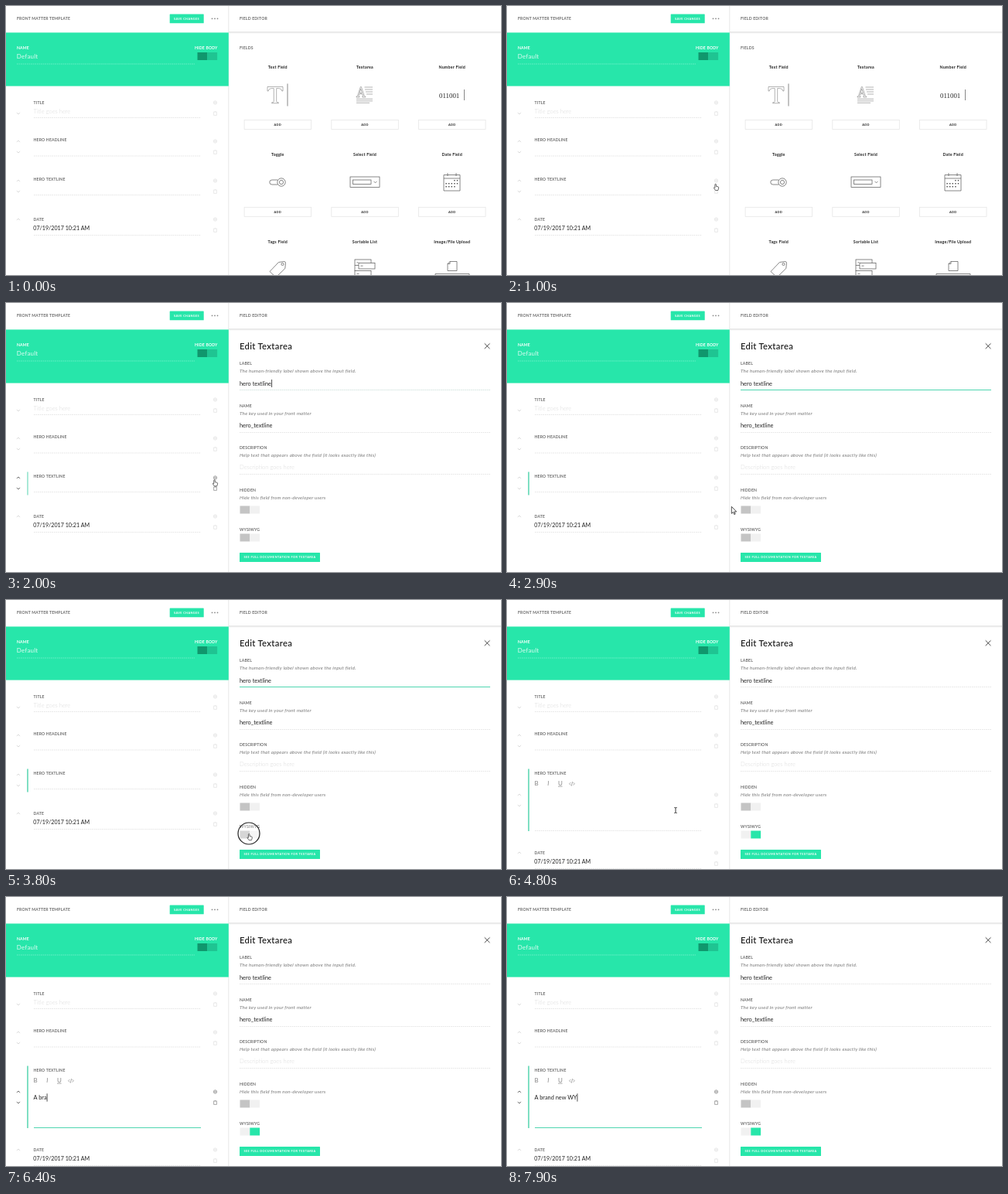
An HTML page that plays this animation: 640x348 px, repeating every 8 s.

```html
<!DOCTYPE html>
<html lang="en">
<head>
<meta charset="utf-8">
<title>Field editor</title>
<style>
html, body { margin: 0; width: 100%; height: 100%; overflow: hidden; background: #fff; }
svg { display: block; font-family: Lato, "Open Sans", sans-serif; fill: none; }
text { fill: #222; white-space: pre; }
.label { font-size: 5.1px; font-weight: 700; letter-spacing: .18px; fill: #6c6c6c; }
.help { font-size: 6.3px; font-style: italic; letter-spacing: .2px; fill: #777; }
.value { font-size: 7.4px; }
.hint { font-size: 7.5px; font-weight: 300; fill: #d8d8d8; }
.title { font-size: 11.2px; font-weight: 600; letter-spacing: .32px; }
.card { font-size: 5.3px; font-weight: 700; letter-spacing: .22px; text-anchor: middle; }
.add { font-size: 3.9px; font-weight: 700; letter-spacing: .25px; text-anchor: middle; }
.button { font-size: 3.8px; font-weight: 700; letter-spacing: .4px; fill: #fff; }
.white { fill: #fff; }
.dash { stroke: #dadada; stroke-width: .7; stroke-dasharray: 1.6 1; }
.icon { stroke: #555; stroke-width: .7; }
.thin { stroke-width: .45; }
.ctl { stroke: #333; stroke-width: .7; }
.faint { opacity: .6; }
.focus { stroke: #4fd6b0; stroke-width: 1; }
.caret { stroke: #222; stroke-width: .8; }
.tool { font-size: 8px; fill: #888; }
</style>
</head>
<body>
<svg id="stage" width="640" height="348" viewBox="0 0 640 348"></svg>
<script>
const GREEN = '#27e6aa', LOOP = 8000, REST = .25;

// Markup helpers
const text = (cls, x, y, s) => `<text class="${cls}" x="${x}" y="${y}">${s}</text>`;
const rect = (x, y, w, h, attrs) => `<rect x="${x}" y="${y}" width="${w}" height="${h}" ${attrs}/>`;
const path = (d, attrs = '') => `<path d="${d}" ${attrs}/>`;
const group = (id, body, attrs = '') => `<g id="${id}" ${attrs}>${body}</g>`;
const dash = (x1, x2, y) => path(`M${x1} ${y}H${x2}`, 'class="dash"');

// Row controls around y: move arrows on the left, gear and bin on the right
function controls(id, y, up, down) {
  const b = y + 14;
  return group(id,
    (up ? path(`M13.8 ${y + 1}l2.2-2 2.2 2`) : '') +
    (down ? path(`M13.8 ${b - 1}l2.2 2 2.2-2`) : '') +
    '<g class="faint">' +
    `<circle cx="270.5" cy="${y}" r="2.2"/><circle cx="270.5" cy="${y}" r=".9"/>` +
    path(`M268 ${b - 1.9}h5M269.7 ${b - 2.6}h1.6M268.6 ${b - 1.6}v4h3.8v-4`) + '</g>',
    `class="ctl" style="opacity:${REST}"`);
}

const toggle = (y, id = '') =>
  rect(302.5, y, 12.8, 10, `${id && `id="${id}L"`} fill="#c4c4c4"`) +
  rect(315.3, y, 12.8, 10, `${id && `id="${id}R"`} fill="#f1f1f1"`);

function leftPane() {
  return text('label', 14, 18, 'FRONT MATTER TEMPLATE') +
    rect(211.7, 10.4, 44, 11.8, `rx=".5" fill="${GREEN}"`) +
    text('button', 217, 17.7, 'SAVE CHANGES') +
    [266.5, 270, 273.5].map(x => `<circle cx="${x}" cy="16.3" r=".9" fill="#888"/>`).join('') +
    rect(0, 34.4, 287.8, 69.2, `fill="${GREEN}"`) +
    text('label white', 14, 56, 'NAME') + text('label white', 244, 56, 'HIDE BODY') +
    `<text x="13.8" y="68.3" font-size="8" letter-spacing=".2" class="white" opacity=".85">Default</text>` +
    path('M14 75H244', 'stroke="#7df2cf" stroke-width=".8" stroke-dasharray="1.6 1"') +
    rect(247.5, 60, 12.8, 10, 'fill="#10976d"') + rect(260.3, 60, 12.8, 10, 'fill="#1fc492"') +
    text('label', 35.5, 127, 'TITLE') + text('hint', 35.5, 139, 'Title goes here') +
    dash(36, 252, 144.5) + controls('c1', 125, false, true) +
    text('label', 35.5, 175.2, 'HERO HEADLINE') + dash(36, 252, 194) + controls('c2', 175, true, true) +
    rect(27, 218.5, 2, 30, 'id="bar" fill="#7fdfc3"') +
    text('label', 35.5, 225.8, 'HERO TEXTLINE') + group('line', dash(36, 252, 244.5)) +
    controls('c3', 226, true, true) +
    group('tools',
      text('tool', 35.6, 240.4, 'B') +
      '<text class="tool" x="52.2" y="240.4" font-style="italic">I</text>' +
      text('tool', 66, 239.8, 'U') +
      path('M66 241.2h5.6M82.4 236l-1.8 1.8 1.8 1.8M85.6 236l1.8 1.8-1.8 1.8M84.7 235l-1.4 5.6', 'stroke="#888" stroke-width=".7"')) +
    path('M36 298.5H252', 'id="typeLine" class="focus"') +
    '<text id="typed" class="value" x="35.5" y="262"></text>' +
    path('M0 254.3V264.6', 'id="typeCaret" class="caret"') +
    group('date', text('label', 35.5, 278.2, 'DATE') +
      '<text x="35.3" y="289.8" font-size="7.15">07/19/2017 10:21 AM</text>' +
      dash(36, 252, 296.5) + controls('c4', 276, true, false));
}

function calendar() {
  let dots = '';
  for (let r = 0; r < 3; r++)
    for (let c = 0; c < 5; c++)
      if ((r || c > 2) && (r < 2 || c < 4))
        dots += rect(568.4 + c * 3.6, 225 + r * 4, 1.4, 1.4, 'fill="#444" stroke="none"');
  return path('M566 218.5h21v20.5h-21zM566 223h21M571 216v4M582 216v4') + dots;
}

function cards() {
  const names = ['Text Field', 'Textarea', 'Number Field', 'Toggle', 'Select Field', 'Date Field',
    'Tags Field', 'Sortable List', 'Image/File Upload'];
  const icons =
    path('M338 104.5h20v5.5h-1.2q-.4-3.4-4-3.4h-3.1v17q0 1.2 2.6 1.2v1h-8.6v-1q2.6 0 2.6-1.2v-17h-3.1q-3.6 0-4 3.4h-1.2z', 'class="thin"') +
    path('M364 100.5v29') +
    path('M453 118v-.8q1.2 0 1.6-1.2l3.8-11.4h1l3.8 11.4q.4 1.2 1.6 1.2v.8h-4v-.8q1.2 0 .8-1.2l-.7-2.2h-4.2l-.7 2.2q-.4 1.2 1 1.2v.8zM457 112.6h3.4l-1.7-5.4z', 'class="thin"') +
    path('M463.5 105h10.5M464 108h10M465 111h9M466 114h8M453 120.3h21M453 122.8h21M453 125.3h17', 'class="thin"') +
    '<text x="560" y="118.5" font-size="8.9" style="font-family:\'Liberation Serif\',serif" stroke="none">011001</text>' +
    path('M592.5 108v14') +
    path('M351.3 225h-7.5a3 3 0 0 0 0 6h7.5') +
    '<circle cx="356" cy="228" r="5.2"/><circle cx="356" cy="228" r="2.6"/>' +
    rect(445, 221, 38, 13.5, '') + rect(448.5, 225, 23.5, 5.5, '') + path('M475.5 226.8l2 2 2-2') +
    calendar() +
    path('M341 343.5L352.5 331.5 359.5 330.5Q361.5 330.5 361.5 332.5L360.8 339.5 349 351z') +
    '<circle cx="357.5" cy="334" r="1.6"/>' +
    rect(451, 328, 21, 7.5, '') + rect(451, 342.5, 21, 7.5, '') +
    rect(456, 332.5, 21, 7.5, 'fill="#fff"') + path('M453.5 331.8h2M458.5 336.2h3M453.5 346.3h3M451 335.5v7') +
    path('M574 330.5h9v12h-12v-9zM574 330.5v3h-3M555 349v-2.5h44v2.5');
  return text('label', 302, 55.8, 'FIELDS') + group('icons', icons, 'class="icon"') +
    names.map((name, i) => {
      const x = 351.3 + i % 3 * 112.7, y = Math.floor(i / 3) * 112.8;
      return text('card', x, 81 + y, name) +
        rect(x - 43.2, 147.5 + y, 86.5, 12, 'stroke="#e6e6e6" stroke-width=".8"') +
        text('add', x, 155 + y, 'ADD');
    }).join('');
}

function editor() {
  return text('title', 302, 60.3, 'Edit Textarea') +
    path('M618.7 52.3l6.8 6.8M625.5 52.3l-6.8 6.8', 'stroke="#333" stroke-width=".9"') +
    text('label', 302, 80, 'LABEL') +
    text('help', 302, 90.2, 'The human-friendly label shown above the input field.') +
    text('value', 302, 106.6, 'hero textline') +
    dash(302, 626, 112.5) + path('M302 112.5H626', 'id="labelLine" class="focus"') +
    path('M343.6 99V109', 'id="labelCaret" class="caret"') +
    text('label', 302, 134.6, 'NAME') +
    text('help', 302, 145, 'The key used in your front matter') +
    text('value', 302, 160.8, 'hero_textline') + dash(302, 626, 167.5) +
    text('label', 302, 188.9, 'DESCRIPTION') +
    text('help', 302, 199.3, 'Help text that appears above the field (it looks exactly like this)') +
    text('hint', 302, 215.4, 'Description goes here') + dash(302, 626, 221.5) +
    text('label', 302, 243.6, 'HIDDEN') +
    text('help', 302, 254.2, 'Hide this field from non-developer users') + toggle(262.5) +
    text('label', 302, 294.6, 'WYSIWYG') + toggle(298.5, 'sw') +
    rect(302, 323, 104, 12, `rx=".5" fill="${GREEN}"`) +
    text('button', 307.5, 330.3, 'SEE FULL DOCUMENTATION FOR TEXTAREA');
}

const pointerStyle = 'fill="#fff" stroke="#222" stroke-width=".8" stroke-linejoin="round"';
stage.innerHTML =
  '<defs><linearGradient id="shade" x2="0" y2="1"><stop stop-color="#dcdcdc"/><stop offset="1" stop-color="#fff"/></linearGradient></defs>' +
  rect(0, 0, 640, 348, 'fill="#fff"') +
  path('M287.8 0V348', 'stroke="#e6e6e6" stroke-width=".9"') + leftPane() +
  text('label', 302, 18, 'FIELD EDITOR') + rect(288, 33.3, 352, 2.6, 'fill="url(#shade)"') +
  group('cards', cards()) + group('editor', editor()) +
  '<circle id="click" cx="314" cy="302" fill="#fff" fill-opacity=".3" stroke="#222" stroke-width="1.2"/>' +
  group('pointer',
    path('M0 0V9l2.1-1.9 1.4 3.1 1.4-.6-1.4-3h2.9z', `id="arrow" ${pointerStyle}`) +
    path('M-.9.6a.9.9 0 0 1 1.8 0V3.2l3 .7q1 .3.9 1.4l-.5 2.5-.6 1.5h-3.8l-2.5-3.6q.3-1.2 1.2-.6l.5.5z', `id="hand" transform="scale(.85)" ${pointerStyle}`) +
    path('M-1.7-3.6Q0-3.6 0-2.6 0-3.6 1.7-3.6M-1.7 3.6Q0 3.6 0 2.6 0 3.6 1.7 3.6M0-2.6V2.6', 'id="beam" stroke="#222" stroke-width=".9"'));

const $ = id => document.getElementById(id);
const show = (id, on) => $(id).style.opacity = +on;
const ramp = (t, a, b) => Math.min(1, Math.max(0, (t - a) / (b - a)));
const smooth = p => p * p * (3 - 2 * p);
const shift = (id, y) => $(id).setAttribute('transform', `translate(0 ${y})`);

// Pointer journeys: start, end, from, to
const moves = [
  [400, 1050, [278, 325], [269.5, 229]],
  [2400, 3450, [269.5, 229], [314.2, 302.8]],
  [4150, 4800, [314.2, 302.8], [218, 272]]
];
const phrase = 'A brand new WY';
const keys = [5500, 5700, 6000, 6200, 6400, 6500, 6600, 6700, 6800, 7000, 7200, 7300, 7500, 7900];

function movePointer(t) {
  const [a, b, p, q] = moves.filter(m => m[0] <= t).pop() || moves[0];
  const k = smooth(ramp(t, a, b));
  const x = p[0] + (q[0] - p[0]) * k, y = p[1] + (q[1] - p[1]) * k;
  $('pointer').setAttribute('transform', `translate(${x} ${y})`);
  show('pointer', t >= 400 && t < 5500);
  const hand = t < 4150 ? Math.hypot(x - 270, y - 228) < 12 || Math.hypot(x - 314, y - 303) < 9 : x > 303;
  const beam = t > 4150 && x < 252;
  show('hand', hand);
  show('beam', beam);
  show('arrow', !hand && !beam);
}

function draw(t) {
  const open = t >= 1950, tall = t >= 4400, on = t >= 4000;
  $('cards').style.display = open ? 'none' : '';
  $('editor').style.display = open ? '' : 'none';

  // Selected row
  show('bar', open && .6 + .4 * ramp(t, 1950, 2250));
  $('bar').setAttribute('height', tall ? 80.5 : 30);
  shift('line', tall ? 54 : 0);
  shift('c3', tall ? 26 : 0);
  shift('date', tall ? 51 : 0);
  show('tools', tall);
  const hover = ramp(t, 1350, 1500) - ramp(t, 2450, 2650) + ramp(t, 4900, 5100);
  show('c3', REST + (1 - REST) * hover);

  // Label input and switch
  show('labelLine', ramp(t, 1980, 2250) - ramp(t, 3900, 4200));
  show('labelCaret', t < 3900 && (t - 1950) % 1060 < 530);
  $('swL').setAttribute('fill', on ? '#f1f1f1' : '#c4c4c4');
  $('swR').setAttribute('fill', on ? GREEN : '#f1f1f1');
  const press = smooth(ramp(t, 3500, 3700));
  $('click').setAttribute('r', 7 + 7 * press);
  show('click', press && 1 - ramp(t, 3900, 4100));

  // Typing
  $('typed').textContent = phrase.slice(0, keys.filter(k => k <= t).length);
  $('typeCaret').setAttribute('transform', `translate(${36 + $('typed').getComputedTextLength()} 0)`);
  show('typeCaret', t >= 5050);
  show('typeLine', ramp(t, 4950, 5100));
  movePointer(t);
}

const start = performance.now();
function tick() {
  draw((performance.now() - start) % LOOP);
  requestAnimationFrame(tick);
}
tick();
</script>
</body>
</html>
```
